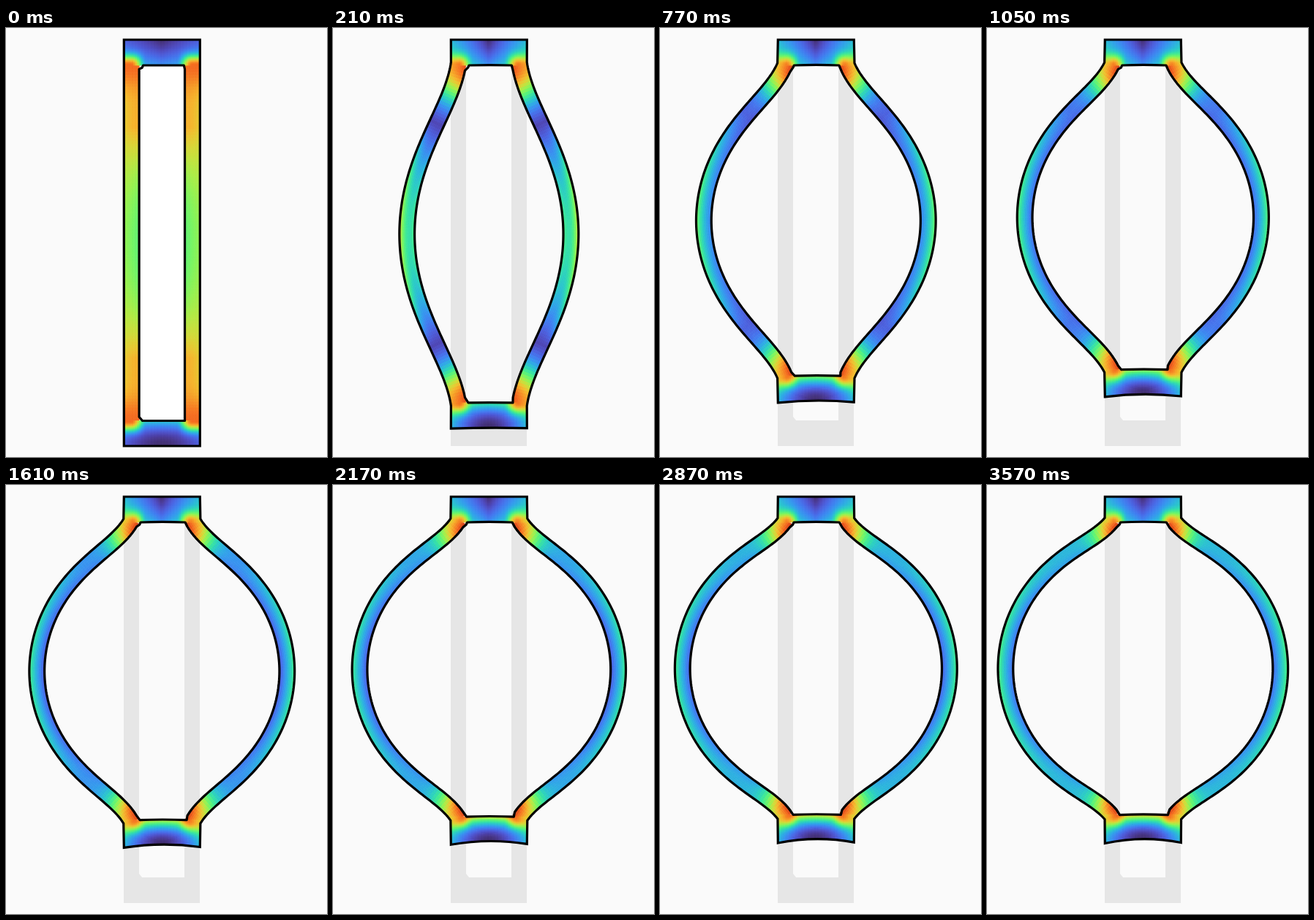
Recreate the animation shown at these times as an HTML page with a canvas. Size 439 by 586 pixels, loop 3640 ms.

```html
<!DOCTYPE html>
<html lang="en">
<head>
<meta charset="utf-8">
<title>Inflating frame</title>
<style>
html, body { margin: 0; width: 100%; height: 100%; overflow: hidden; background: #fafafa; }
canvas { display: block; width: 439px; height: 586px; }
</style>
</head>
<body>
<canvas id="stage" width="439" height="586"></canvas>
<script>
const ctx = document.getElementById('stage').getContext('2d');
const STEP = 70, COUNT = 52, LAST = STEP * (COUNT - 1);
const AXIS = 213.3, TOP = 16, INNER_TOP = 51, OUTER = 52, HALF = 10.4, MID = OUTER - HALF;
const CLAMP = 3, SEGS = 120, COLS = 8, PAPER = '#fafafa';

// Rainbow colour map: one polynomial per channel
const RED = [.136, 4.615, -42.66, 132.131, -152.942, 59.286];
const GREEN = [.091, 2.194, 4.843, -14.185, 4.277, 2.83];
const BLUE = [.107, 12.642, -60.582, 110.363, -89.903, 27.348];

const clamp = (v, a = 0, b = 1) => Math.min(b, Math.max(a, v));
const mix = (a, b, f) => a + (b - a) * f;
const smooth = (a, b, v) => { const z = clamp((v - a) / (b - a)); return z * z * (3 - 2 * z); };
const bell = v => Math.exp(-v * v);

function colour(v) {
  const x = clamp(v, .01, .95);
  const rgb = [RED, GREEN, BLUE].map(p =>
    Math.round(8 + 238 * clamp(p.reduceRight((sum, k) => sum * x + k, 0))));
  return `rgb(${rgb})`;
}

// Fast buckling first, then slow stretching. Stress triples run outer, centre, inner.
function stateAt(t) {
  const bent = t > 0;
  const bulge = bent ? 119.6 + .0075 * t - 70 * Math.exp(-t / 468) - 49 * Math.exp(-t / 100) : 0;
  const q = bulge / 146.4, cube = q ** 3;
  const floor = 536.5 - .00495 * bulge ** 2 * (1 - .19 * q ** 11);
  const bend = Math.exp(-t / 900), pull = t / LAST;
  const f = .03 + .22 * (1 - bend) ** 2;
  return {
    bent, bulge, floor, q,
    tension: 2 + 6 * cube,
    grip: 1 - .42 * q * q,
    reach: bent ? .1 - .045 * cube : .06,
    base: floor + 34.5 + 4 * cube,
    arch: 5.5 * cube,
    mid: bent
      ? [.25 + .42 * bend + .15 * pull, .12 + .28 * bend + .12 * pull, .04 + .6 * bend ** 2 + .08 * pull]
      : [.5, .46, .42],
    flank: bent ? [f, f, .8 * f] : [.62, .66, .67]
  };
}

// Beam under tension with slightly yielding ends, unit length
function integrate(amp, k, grip) {
  const angle = s => {
    const z = 1 - 2 * s;
    return amp * (z - grip * Math.sinh(k * z) / Math.sinh(k));
  };
  const pts = [[0, 0, angle(0)]];
  let x = 0, y = 0;
  for (let i = 0; i < SEGS; i++) {
    const th = angle((i + .5) / SEGS);
    x += Math.sin(th) / SEGS;
    y += Math.cos(th) / SEGS;
    pts.push([x, y, angle((i + 1) / SEGS)]);
  }
  return pts;
}

function strutLine(st) {
  const y0 = INNER_TOP - CLAMP, height = st.floor + CLAMP - y0;
  const ratio = st.bulge / height;
  let lo = 0, hi = 4, pts;
  for (let i = 0; i < 26; i++) {
    const amp = (lo + hi) / 2;
    pts = integrate(amp, st.tension, st.grip);
    if (pts[SEGS / 2][0] / pts[SEGS][1] < ratio) lo = amp; else hi = amp;
  }
  const len = height / pts[SEGS][1];
  // e runs from -1 (inner edge) to 1 (outer edge); x is measured from the axis
  return (i, e) => {
    const [x, y, th] = pts[i];
    return [MID + x * len + e * HALF * Math.cos(th), y0 + y * len - e * HALF * Math.sin(th)];
  };
}

const across = ([o, c, i], e) => c + (o - i) / 2 * e + ((o + i) / 2 - c) * e * e;
const jointStress = (st, e) => .78 - .05 * st.q - .14 * st.q * e;

function strutStress(st, s, e) {
  const u = Math.min(s, 1 - s), z = clamp((u - .18) / .32);
  const n = across(st.flank, e);
  const body = mix(n, across(st.mid, e), 1 - (1 - z) ** 2);
  return body + (jointStress(st, e) - n) * bell(Math.max(0, u - .01) / st.reach);
}

function blockStress(st, x, d, lower) {
  const ax = Math.abs(x);
  const side = (st.bent ? .23 : .08) * ax ** (lower ? 2 : 1);
  const edge = lower ? (.25 + .35 * st.q ** 2) * d ** 2.5 : .15 * d ** 1.5;
  const joint = bell((1 - d) * 2.9) * smooth(.4, .8, ax);
  return mix(.03 + side + edge, jointStress(st, (ax * OUTER - MID) / HALF), joint);
}

function cell(pts, v) {
  ctx.beginPath();
  pts.forEach(p => ctx.lineTo(p[0], p[1]));
  ctx.closePath();
  ctx.fillStyle = ctx.strokeStyle = colour(v);
  ctx.fill();
  ctx.stroke();
}

function drawStrut(st, line, side) {
  const at = (i, e) => { const [x, y] = line(i, e); return [AXIS + side * x, y]; };
  for (let i = 0; i < SEGS; i++) {
    for (let j = 0; j < COLS; j++) {
      const a = -1 + 2 * j / COLS, b = a + 2 / COLS;
      cell([at(i, a), at(i, b), at(i + 1, b), at(i + 1, a)],
        strutStress(st, (i + .5) / SEGS, (a + b) / 2));
    }
  }
}

function drawBlock(st, lower) {
  const nx = 40, ny = 16;
  const at = (x, d) => {
    const outer = lower ? st.base - st.arch * (1 - x * x) : TOP;
    return [AXIS + x * OUTER, mix(outer, lower ? st.floor : INNER_TOP, d)];
  };
  for (let i = 0; i < nx; i++) {
    for (let j = 0; j < ny; j++) {
      const a = -1 + 2 * i / nx, b = a + 2 / nx, c = j / ny, d = c + 1 / ny;
      cell([at(a, c), at(b, c), at(b, d), at(a, d)],
        blockStress(st, (a + b) / 2, (c + d) / 2, lower));
    }
  }
}

// Undeformed shape left behind
function drawGhost(bent) {
  ctx.fillStyle = '#e6e6e6';
  ctx.fillRect(161, TOP, 104, 555);
  ctx.fillStyle = bent ? PAPER : '#fff';
  ctx.beginPath();
  [[186, 51], [244, 51], [244, 536], [186, 536], [182, 531], [182, 56]].forEach(p => ctx.lineTo(...p));
  ctx.fill();
}

function drawOutline(st, line) {
  const edge = e => Array.from({ length: SEGS + 1 }, (_, i) => line(i, e));
  const right = p => [AXIS + p[0], p[1]], left = p => [AXIS - p[0], p[1]];
  const trace = pts => pts.forEach(p => ctx.lineTo(...p));
  const outer = edge(1).filter(p => p[0] > OUTER - .2);
  const inner = edge(-1).filter(p => p[1] > 56 && p[1] < st.floor - 4);
  const first = left(inner[0]), last = left(inner[inner.length - 1]);

  ctx.strokeStyle = '#000';
  ctx.lineWidth = 3.2;
  ctx.lineJoin = 'miter';
  ctx.beginPath();
  ctx.moveTo(AXIS - OUTER, TOP);
  ctx.lineTo(AXIS + OUTER, TOP);
  trace(outer.map(right));
  ctx.lineTo(AXIS + OUTER, st.base - .5 * st.q);
  ctx.quadraticCurveTo(AXIS, st.base - 2 * st.arch, AXIS - OUTER, st.base + .5 * st.q);
  trace(outer.map(left).reverse());
  ctx.closePath();
  ctx.stroke();

  ctx.lineJoin = 'round';
  ctx.beginPath();
  ctx.moveTo(first[0] + 5.5, INNER_TOP);
  ctx.quadraticCurveTo(AXIS, INNER_TOP - 1.5 * st.q, AXIS + 30 + 2 * st.q, INNER_TOP);
  trace(inner.map(right));
  ctx.lineTo(AXIS + 31.2 + 3 * st.q, st.floor);
  ctx.quadraticCurveTo(AXIS, st.floor - 1.5 * st.q, last[0] + 4.5, st.floor);
  trace(inner.map(left).reverse());
  ctx.lineTo(first[0] + 4, 54.2);
  ctx.closePath();
  ctx.stroke();
}

function draw(t) {
  const st = stateAt(t), line = strutLine(st);
  ctx.fillStyle = PAPER;
  ctx.fillRect(0, 0, 439, 586);
  drawGhost(st.bent);
  ctx.lineWidth = .7;
  ctx.lineJoin = 'round';
  drawStrut(st, line, -1);
  drawStrut(st, line, 1);
  drawBlock(st, false);
  drawBlock(st, true);
  drawOutline(st, line);
}

const start = performance.now();
let shown = -1;
function tick() {
  const n = Math.floor((performance.now() - start) / STEP) % COUNT;
  if (n !== shown) draw((shown = n) * STEP);
  requestAnimationFrame(tick);
}
tick();
</script>
</body>
</html>
```
